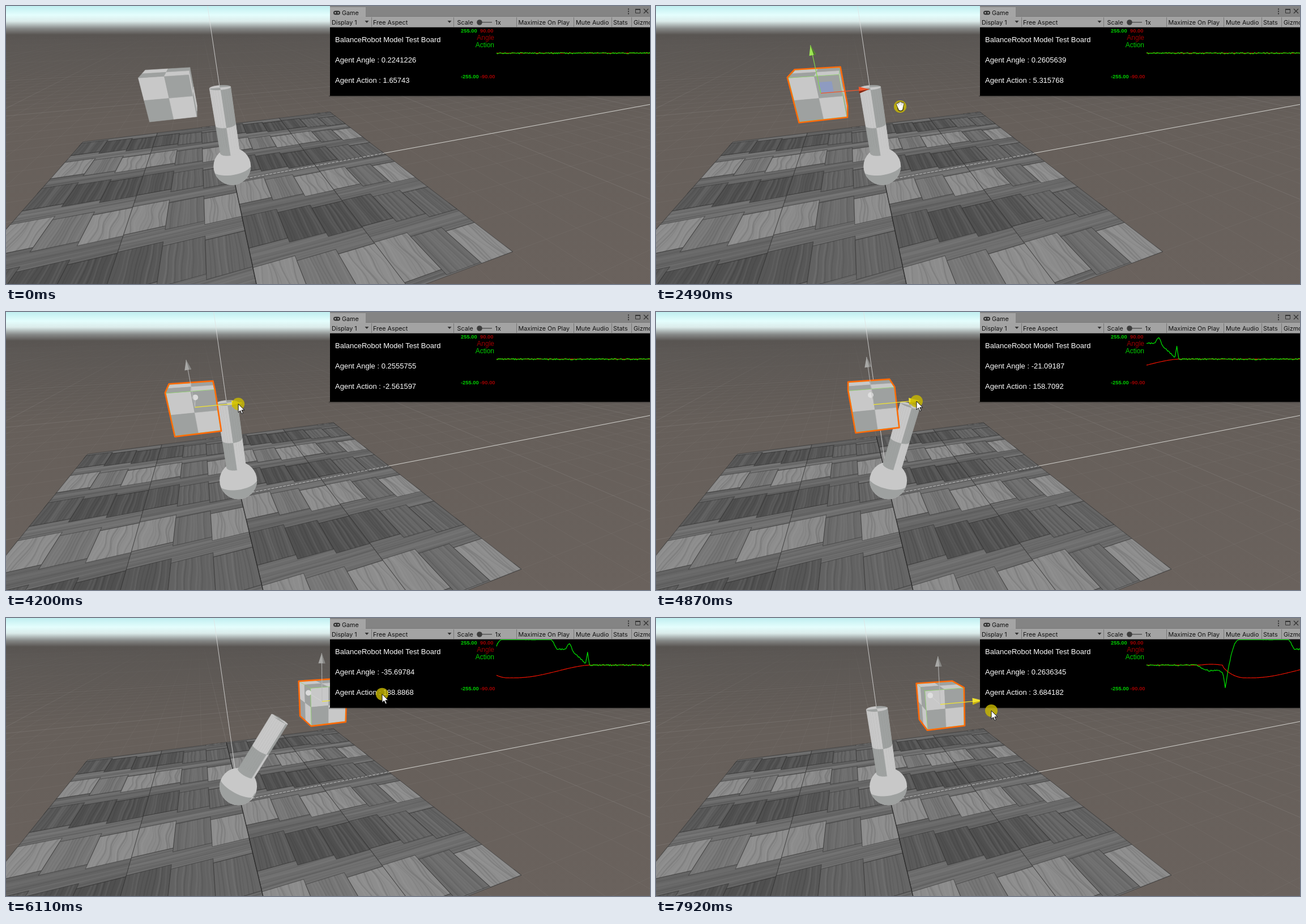
Recreate the animation shown at these times as an HTML page with a canvas. Size 1137 px wide and 492 px high, loop 7.99 s.

```html
<!DOCTYPE html>
<html lang="en">
<head>
<meta charset="utf-8">
<title>Balance robot test</title>
<style>
html, body { margin: 0; width: 100%; height: 100%; overflow: hidden; background: #655e59; }
canvas { display: block; width: 1137px; height: 492px; }
</style>
</head>
<body>
<canvas id="stage" width="1137" height="492"></canvas>
<script>
const W = 1137, H = 492, LOOP = 7990, STEP = 77.6;
const view = document.getElementById('stage').getContext('2d');
const floorCanvas = document.createElement('canvas');
floorCanvas.width = W;
floorCanvas.height = H;
const back = floorCanvas.getContext('2d');
let g = view;

const LIGHT = '#c8c8c8', DARK = '#9ea1a0', ORANGE = '#ff6a0a';
const UI = 'Inter, "Open Sans", sans-serif', SANS = '"Liberation Sans", Arial, sans-serif';

// Times are counted in steps; one step is one change of the picture.
const SHOW = 18, SELECT = 23, HAND = 31, PAN = 32, PANNED = 38, HOVER = 40, DRAG = 46, TOUCH = 54.4, SLIP = 76, UPRIGHT = 82;
const CUBE = [[DRAG, -1.143], [55, -.72], [63, -.1], [73, 1.1], [79, 2.555], [81, 2.75], [102, 1.635]];
const POINTER = [[SHOW, 400, 388], [SELECT, 292, 165], [PAN - 2, 431, 178], [PAN, 431, 178], [PANNED, 444, 196], [43, 377, 179]];
const GRIP = [[DRAG, 77, -6], [63, 76, -6], [79, 106, -13], [102, 90, 11]];

const hash = n => { const v = Math.sin(n * 127.1 + 3.7) * 43758.5453; return v - Math.floor(v); };
const mix = (a, b, k) => a + (b - a) * k;
const clamp = (v, lo, hi) => Math.min(hi, Math.max(lo, v));
const ramp = (s, a, b) => clamp((s - a) / (b - a), 0, 1);
const bump = (s, at, width) => Math.exp(-(((s - at) / width) ** 2));

function track(keys, s, col = 1) {
  const i = keys.findIndex(k => s <= k[0]);
  if (i < 0) return keys[keys.length - 1][col];
  if (i === 0) return keys[0][col];
  const a = keys[i - 1], b = keys[i];
  return mix(a[col], b[col], ramp(s, a[0], b[0]));
}

// The robot leans while pushed, swings back once the cube slips off, and overshoots a little.
function angleAt(s) {
  const push = Math.sin(Math.PI / 2 * ramp(s, TOUCH, 74.4)) ** 1.6;
  const release = Math.max(0, Math.cos(Math.PI / 2 * ramp(s, SLIP, UPRIGHT))) ** .66;
  const over = 3 * Math.sin(Math.PI * ramp(s, UPRIGHT, UPRIGHT + 6));
  return .26 - 45.2 * push * release + over + (hash(Math.floor(s * 4)) - .5) * .1;
}

// The motor answers the push, saturates, reverses for a moment and settles.
function actionAt(s) {
  const noise = (hash(Math.floor(s * 4) + 500) - .5) * 14;
  const full = 262, low = -245, drop = 77.6, turn = 81.3;
  if (s > turn) return noise + (low + 55) * Math.exp((turn - s) / .35) - 55 * (1 - ramp(s, 85.8, 89));
  if (s > drop) return noise + mix(full, low, ramp(s, drop, turn) ** 2);
  const rise = 160 * ramp(s, 55, 59.5) + 133 * bump(s, 55, .3) + 60 * bump(s, 59.8, .6);
  return noise + mix(rise, full, ramp(s, 63, 64.5));
}

// Camera: world x to the right, u up, z away from the viewer.
const FOCAL = 529, CX = 568, CY = 246;
let pan = 0;
function toCam([x, u, z]) {
  return [
    -2.71 + .174 * pan + .9302 * x - .3674 * z,
    1.035 + .233 * pan - .1501 * x - .9126 * u - .3802 * z,
    8.69 + .335 * x - .4088 * u + .8487 * z
  ];
}
const flat = ([x, y, d]) => [CX + FOCAL * x / d, CY + FOCAL * y / d];
const project = p => flat(toCam(p));

function path(pts, closed = true) {
  g.beginPath();
  pts.forEach(p => g.lineTo(p[0], p[1]));
  if (closed) g.closePath();
}
function fill(pts, color) { path(pts); g.fillStyle = color; g.fill(); }
function stroke(pts, color, width = 1, closed = false) {
  path(pts, closed);
  g.strokeStyle = color;
  g.lineWidth = width;
  g.stroke();
}
function disc(x, y, r, color) {
  g.beginPath();
  g.arc(x, y, r, 0, 7);
  g.fillStyle = color;
  g.fill();
}
function face(world, color) {
  const pts = world.map(project);
  const area = pts.reduce((sum, p, i) => {
    const q = pts[(i + 1) % pts.length];
    return sum + p[0] * q[1] - q[0] * p[1];
  }, 0);
  if (area <= 0) return;
  fill(pts, color);
  stroke(pts, color, .6, true);
}
function line3(a, b, color, width = 1) {
  const near = .4;
  let p = toCam(a), q = toCam(b);
  if (p[2] < near && q[2] < near) return;
  const cut = (from, to) => from.map((v, i) => mix(v, to[i], (near - from[2]) / (to[2] - from[2])));
  if (p[2] < near) p = cut(p, q);
  else if (q[2] < near) q = cut(q, p);
  stroke([flat(p), flat(q)], color, width);
}
function gradient(stops) {
  const grad = g.createLinearGradient(0, 0, 0, H);
  stops.forEach(([y, c]) => grad.addColorStop(y / H, c));
  return grad;
}

function plank(x, z, w, d, tone, seed) {
  const x0 = clamp(x, -5, 5), x1 = clamp(x + w, -5, 5), z0 = clamp(z, -5, 5), z1 = clamp(z + d, -5, 5);
  if (x1 - x0 < .01 || z1 - z0 < .01) return;
  const shape = [[x0, 0, z0], [x0, 0, z1], [x1, 0, z1], [x1, 0, z0]].map(project);
  fill(shape, `rgb(${tone},${tone},${tone})`);
  const along = w < 1, wave = tone > 130 ? .04 : .012;
  for (let k = 1; k < 12; k++) {
    const r = hash(seed * 31 + k), pts = [];
    for (let i = 0; i <= 8; i++) {
      const f = i / 8, c = (k + r * .8) / 12.8 + wave * Math.sin(f * (4 + seed % 4) + k * .7 + seed);
      pts.push(project(along ? [mix(x0, x1, c), 0, mix(z0, z1, f)] : [mix(x0, x1, f), 0, mix(z0, z1, c)]));
    }
    stroke(pts, r > .55 ? `rgba(190,190,190,${r * .09})` : `rgba(30,30,30,${.05 + r * .15})`, 1.5 + r * 2);
  }
  stroke(shape, 'rgba(45,45,45,.5)', 1.1, true);
}

// Rows of three upright boards, each a little lower than the last, woven over long cross boards.
function parquet() {
  const w = 2.5 / 3, long = 10 / 9, thin = 5 / 9, stair = .14;
  const eachBlock = draw => {
    for (let col = 0; col < 4; col++) for (let row = -4; row <= 5; row++) {
      const kind = (col & 1) * 2 + (row & 1);
      draw(col * 2.5 - 5, row * 5 / 3 - 1.25 - (col & 1) * .25, kind, row & 1);
    }
  };
  eachBlock((x, z, kind) => plank(x, z - thin - 2 * stair, 2.5, thin + 2 * stair, 98 + Math.round(hash(kind) * 16), 21 + kind));
  eachBlock((x, z, kind, dim) => {
    for (let i = 0; i < 3; i++) {
      const seed = kind * 3 + i + 1;
      const tone = dim ? 80 + hash(seed) * 22 : (i === 1 ? 108 : 134) + hash(seed) * 12;
      plank(x + i * w, z - i * stair, w, long, Math.round(tone), seed);
    }
  });
  line3([0, 0, -5], [0, 0, 5], 'rgba(35,35,35,.65)', 1.4);
}

function drawBackground() {
  g = back;
  g.fillStyle = gradient([[0, '#c0eef0'], [16, '#e4fefd'], [27, '#dbebea'], [40, '#868887'],
    [51, '#595552'], [200, '#665f5a'], [492, '#6a625d']]);
  g.fillRect(0, 0, W, H);
  const mesh = a => gradient([[45, 'rgba(195,195,195,0)'], [180, `rgba(195,195,195,${a})`]]);
  const faint = mesh(.06), clear = mesh(.14);
  for (let i = -40; i <= 60; i++) {
    const ink = i % 10 ? faint : clear;
    line3([i, 0, -30], [i, 0, 70], ink);
    line3([-60, 0, i], [90, 0, i], ink);
  }
  parquet();
  g.setLineDash([5, 2]);
  line3([0, 0, 0], [5, 0, 0], 'rgba(220,220,220,.75)');
  g.setLineDash([]);
  line3([5, 0, 0], [80, 0, 0], 'rgba(225,225,220,.85)');
  line3([-.02, 0, 0], [-.02, 6, 0], 'rgba(225,225,225,.8)');
  g = view;
}

function drawRobot(angle) {
  const a = -angle * Math.PI / 180, cos = Math.cos(a), sin = Math.sin(a);
  const yaw = Math.max(0, -angle - 21) * .04;
  const local = (x, h, z) => [x * cos + h * sin, .48 + h * cos - x * sin, z];
  const ring = (r, h, f) => local(r * Math.sin(f + yaw), h, -r * Math.cos(f + yaw));

  const mid = toCam([0, .47, 0]), [bx, by] = flat(mid), radius = .53 * FOCAL / mid[2];
  disc(bx, by, radius, LIGHT);
  g.save();
  g.beginPath();
  g.arc(bx, by, radius, 0, 7);
  g.clip();
  const lower = [];
  for (let i = -10; i <= 10; i++) lower.push(ring(.54, 0, i * Math.PI / 20 - yaw));
  lower.push(local(.54, -1, 0), local(-.54, -1, 0));
  fill(lower.map(project), DARK);
  g.restore();

  const n = 24, r = .255;
  for (let i = -n / 2; i < n / 2; i++) {
    const f0 = i * 2 * Math.PI / n, f1 = (i + 1) * 2 * Math.PI / n;
    [[.45, 1.25], [1.25, 2.25]].forEach(([lo, hi], part) => {
      const shaded = (i >= 0) === (part === 1);
      face([ring(r, hi, f0), ring(r, hi, f1), ring(r, lo, f1), ring(r, lo, f0)], shaded ? DARK : LIGHT);
    });
  }
  for (let q = 0; q < 4; q++) {
    const wedge = [local(0, 2.25, 0)];
    for (let k = 0; k <= 6; k++) wedge.push(ring(r, 2.25, -(q + k / 6) * Math.PI / 2));
    face(wedge, q % 2 ? LIGHT : DARK);
  }
}

// Each side: top left corner, direction right, direction down.
const SIDES = [
  [[-.5, .5, -.5], [1, 0, 0], [0, -1, 0]],
  [[-.5, .5, .5], [1, 0, 0], [0, 0, -1]],
  [[-.5, .5, .5], [0, 0, -1], [0, -1, 0]],
  [[.5, .5, -.5], [0, 0, 1], [0, -1, 0]]
];

function hull(pts) {
  const sorted = [...pts].sort((a, b) => a[0] - b[0] || a[1] - b[1]);
  const half = list => {
    const out = [];
    for (const p of list) {
      while (out.length > 1) {
        const [a, b] = out.slice(-2);
        if ((b[0] - a[0]) * (p[1] - a[1]) - (b[1] - a[1]) * (p[0] - a[0]) > 0) break;
        out.pop();
      }
      out.push(p);
    }
    return out.slice(0, -1);
  };
  return [...half(sorted), ...half(sorted.reverse())];
}

function drawCube(c, selected) {
  const at = p => p.map((v, i) => v + c[i]);
  const spot = (side, i, j) => at(side[0].map((v, k) => v + side[1][k] * i / 2 + side[2][k] * j / 2));
  for (const side of SIDES) {
    for (let i = 0; i < 2; i++) for (let j = 0; j < 2; j++) {
      face([spot(side, i, j), spot(side, i + 1, j), spot(side, i + 1, j + 1), spot(side, i, j + 1)],
        (i + j) % 2 ? DARK : LIGHT);
    }
  }
  if (!selected) return;
  const corner = (i, size) => project(at([i & 1 ? size : -size, i & 2 ? size : -size, i & 4 ? size : -size]));
  const all = [0, 1, 2, 3, 4, 5, 6, 7], p = all.map(i => corner(i, .5));
  stroke([p[0], p[1], p[3], p[2]], 'rgba(140,215,100,.75)', 1, true);
  stroke([p[2], p[6], p[7], p[3]], 'rgba(140,215,100,.6)');
  g.lineJoin = 'round';
  stroke(hull(all.map(i => corner(i, .512))), ORANGE, 2.6, true);
}

function cone(from, tip, color, shade) {
  const dx = tip[0] - from[0], dy = tip[1] - from[1], len = Math.hypot(dx, dy);
  const nx = -dy / len * 6, ny = dx / len * 6;
  const bx = tip[0] - dx / len * 18, by = tip[1] - dy / len * 18;
  fill([tip, [bx + nx, by + ny], [bx - nx, by - ny]], color);
  fill([tip, [bx + nx, by + ny], [bx + nx * .35, by + ny * .35]], shade);
}

function drawGizmo(c, s) {
  const drag = s >= DRAG, hover = s >= HOVER;
  const size = .153 * toCam(c)[2];
  const off = (x, u, z) => project([c[0] + x * size, c[1] + u * size, c[2] + z * size]);
  const mid = project(c), right = off(1, 0, 0), up = off(0, 1, 0);
  if (drag) {
    const z = off(0, 0, .95);
    stroke([mid, z], 'rgba(215,215,215,.7)');
    disc(z[0], z[1], 5, 'rgba(225,225,225,.9)');
  } else {
    fill([mid, off(.26, 0, 0), off(.26, .24, 0), off(0, .24, 0)], 'rgba(125,150,225,.5)');
  }
  stroke([mid, up], drag ? 'rgba(185,185,185,.8)' : '#83d64b', 1.2);
  cone(mid, up, drag ? '#a8a8a6' : '#9de653', drag ? '#858583' : '#4d7a2c');
  const [bright, shade] = drag ? ['#f2e42e', '#c3ab10'] : hover ? ['#e9e6a0', '#98956a'] : ['#f2562a', '#7e2a18'];
  stroke([mid, right], bright, 1.3);
  cone(mid, right, bright, shade);
}

function label(text, x, y, font, color, align = 'left') {
  g.font = font;
  g.fillStyle = color;
  g.textAlign = align;
  g.fillText(text, x, y);
}
function rect(x, y, w, h, color) { g.fillStyle = color; g.fillRect(x, y, w, h); }

// The newest value enters at the left and travels right.
function graph(valueAt, s, scale, color) {
  const pts = [];
  for (let k = 0; k < 166; k++) {
    const past = s - k / 4;
    pts.push([866 + k / 4 * 6.7, clamp(83.5 - valueAt(past) * scale, 38.5, 128)]);
  }
  stroke(pts, color, 1.2);
}

function drawToolbar() {
  rect(570, 158, W, 3, 'rgba(40,40,40,.35)');
  rect(572, 0, 565, 19, '#848484');
  rect(572, 2, 63, 18, '#a5a5a5');
  rect(572, 19, 565, 19, '#a3a3a3');
  rect(635, 18, 502, 1, '#777');
  rect(572, 37, 565, 1, '#6e6e6e');
  const small = '10.8px ' + UI, ink = '#111', icon = '#333';
  g.beginPath();
  g.roundRect(578, 8.5, 12, 7, 3.5);
  g.fillStyle = icon;
  g.fill();
  [581.5, 586.5].forEach(x => disc(x, 12, 1.3, '#bbb'));
  label('Game', 593, 16, small, ink);
  Object.entries({ 'Display 1': 575, 'Free Aspect': 648, 'Scale': 796.5, '1x': 863.5, 'Maximize On Play': 904.5,
    'Mute Audio': 1006, 'Stats': 1072, 'Gizmos': 1108 }).forEach(([t, x]) => label(t, x, 33, small, ink));
  [645, 790, 901, 1002, 1069, 1104].forEach(x => rect(x, 20, 1, 17, '#777'));
  [637, 783].forEach(x => fill([[x - 3.5, 26], [x + 3.5, 26], [x, 30]], icon));
  rect(836, 28, 22, 1.5, '#555');
  disc(836, 29, 4.8, '#3c3c3c');
  [5, 9, 13].forEach(y => rect(1098, y - .5, 2, 2, icon));
  stroke([[1111.5, 5.5], [1119.5, 5.5], [1119.5, 12.5], [1111.5, 12.5]], icon, 1, true);
  rect(1111, 5, 9, 2, icon);
  stroke([[1126, 5], [1134, 13]], icon, 1.3);
  stroke([[1134, 5], [1126, 13]], icon, 1.3);
}

function drawBoard(s) {
  rect(572, 38, 565, 121, '#000');
  const reading = v => +v.toPrecision(7);
  ['BalanceRobot Model Test Board', 'Agent Angle : ' + reading(angleAt(s)),
    'Agent Action : ' + reading(clamp(actionAt(s), -255, 255))
  ].forEach((t, i) => label(t, 581, 64 + i * 36.2, '13px ' + SANS, '#fff'));
  const bold = 'bold 9.4px ' + SANS, red = '#9c0000', green = '#00cd00';
  label('255.00', 803, 46.5, bold, green);
  label('90.00', 837, 46.5, bold, red);
  label('-255.00', 803, 127.5, bold, green);
  label('-90.00', 837, 127.5, bold, red);
  label('Angle', 862, 60, '12px ' + SANS, red, 'right');
  label('Action', 862, 73, '12px ' + SANS, green, 'right');
  graph(angleAt, s, .5, '#ee1200');
  graph(actionAt, s, .176, '#00e600');
}

function drawHand(x, y) {
  g.lineCap = 'round';
  for (const [color, width] of [['#4a4416', 4], ['#fff', 2.2]]) {
    for (let i = -2; i <= 2; i++) {
      const reach = 7.5 - Math.abs(i - .3) * 1.4;
      stroke([[x + i * 2.6, y - reach], [x + i * 1.5 + .5, y + 2]], color, width);
    }
    disc(x + .8, y + 3, width + 1.6, color);
  }
  g.lineCap = 'butt';
}

function drawPointer(s, cubeAt) {
  if (s < SHOW) return;
  const drag = s >= DRAG, hand = s >= HAND && s <= PANNED;
  const [x, y] = [0, 1].map(i => drag ? cubeAt[i] + track(GRIP, s, i + 1) : track(POINTER, s, i + 1));
  if (drag || hand || s === SELECT) disc(x, y, 11, 'rgba(202,186,0,.8)');
  if (hand) return drawHand(x, y);
  const arrow = [[0, 0], [0, 15], [3.5, 11.8], [6, 17.5], [8.3, 16.5], [5.9, 11], [10.8, 11]].map(p => [p[0] + x, p[1] + y]);
  fill(arrow, '#fff');
  stroke(arrow, '#111', 1, true);
}

let drawnPan = -1;
function frame(now) {
  const s = Math.min(102, Math.floor((now % LOOP) / STEP + .3));
  pan = ramp(s, PAN, PANNED);
  if (pan !== drawnPan) {
    drawBackground();
    drawnPan = pan;
  }
  view.drawImage(floorCanvas, 0, 0);
  const cube = [track(CUBE, s), 2.69, 0], selected = s >= SELECT;
  drawRobot(angleAt(s));
  drawCube(cube, selected);
  if (selected) drawGizmo(cube, s);
  drawToolbar();
  drawBoard(s);
  drawPointer(s, project(cube));
}

const start = performance.now();
function tick() {
  frame(performance.now() - start);
  requestAnimationFrame(tick);
}
tick();
</script>
</body>
</html>
```
